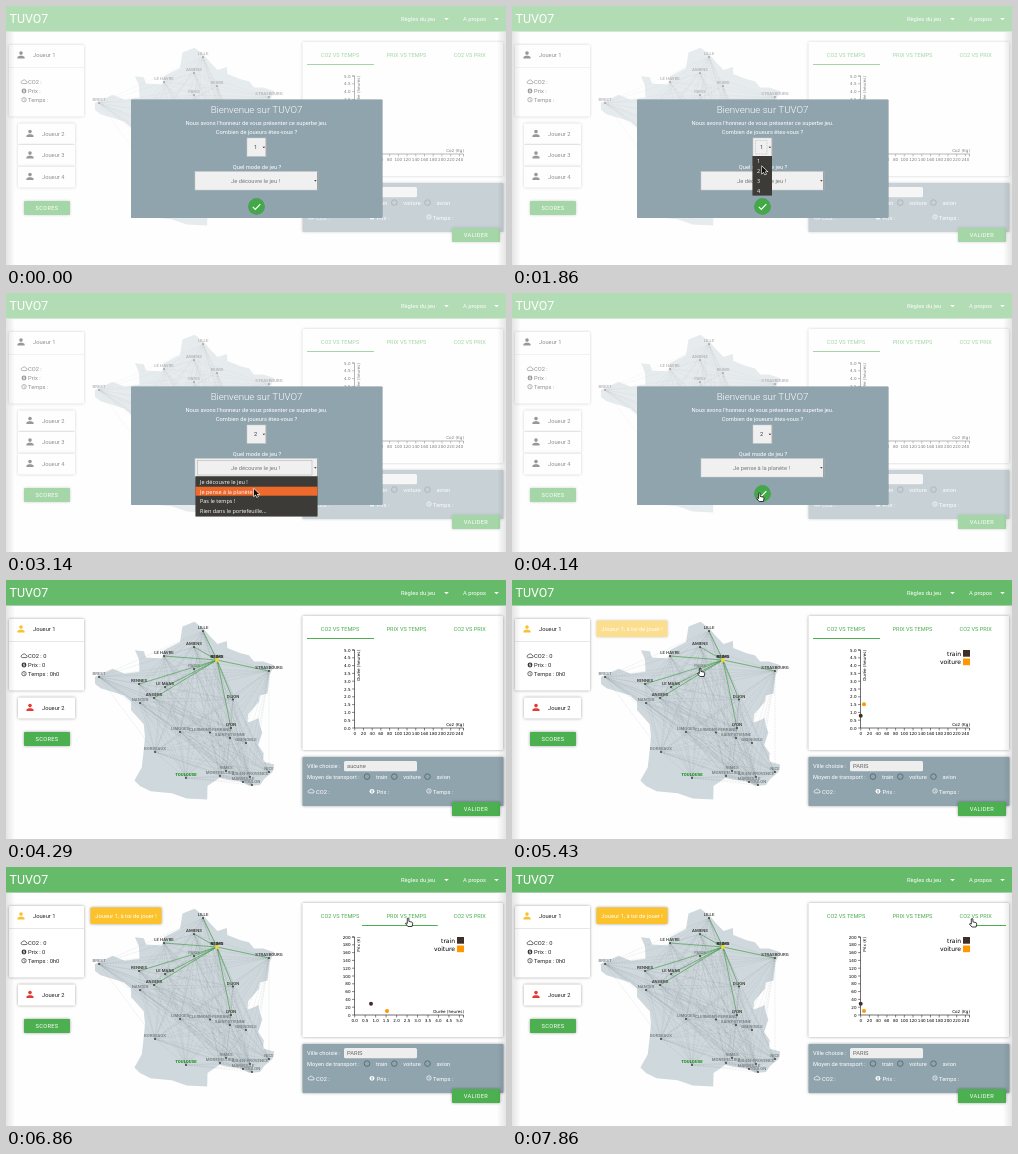
An HTML page for the animation above (8000 ms loop, 500x259 px).

```html
<!DOCTYPE html>
<html lang="fr">
<head>
<meta charset="utf-8">
<title>TUVO7</title>
<style>
html, body { margin: 0; width: 100%; height: 100%; overflow: hidden; background: #fefefe; }
svg { display: block; width: 100%; height: 100%; font: 5.75px Roboto, sans-serif; }
text { white-space: pre; }
.plot { font: 4.1px "DejaVu Sans", sans-serif; }
.menu { font: 5.5px "Open Sans", sans-serif; fill: #fff; }
.city { font: 500 4.3px Roboto, sans-serif; text-anchor: middle; }
.card { filter: drop-shadow(0 .8px 1.4px rgba(0,0,0,.36)); }
.flat { filter: drop-shadow(0 .4px .6px rgba(0,0,0,.2)); }
</style>
</head>
<body>
<svg id="stage" viewBox="0 0 500 259" preserveAspectRatio="none"></svg>
<script>
const LOOP = 8000, START = 4290, PICK = 5430;
const GREEN = '#4caf50', SLATE = '#90a4ae', DARK = '#3e2f28', ORANGE = '#ff9800';

const text = (x, y, s, a = '') => `<text x="${x}" y="${y}" ${a}>${s}</text>`;
const mid = (x, y, s, a = '') => text(x, y, s, 'text-anchor="middle" ' + a);
const rect = (x, y, x2, y2, fill, a = '') =>
  `<rect x="${x}" y="${y}" width="${x2 - x}" height="${y2 - y}" fill="${fill}" ${a}/>`;
const card = (x, y, x2, y2, fill = '#fff') => rect(x, y, x2, y2, fill, 'rx=".8" class="card"');
const dot = (x, y, r, fill, a = '') => `<circle cx="${x}" cy="${y}" r="${r}" fill="${fill}" ${a}/>`;
const path = (d, a = '') => `<path d="${d}" ${a}/>`;
const line = (x, y, x2, y2, a) => path(`M${x} ${y}L${x2} ${y2}`, a);
const group = (id, s, a = '') => `<g id="${id}" ${a}>${s}</g>`;
const caret = (x, y, w, fill) => path(`M${x - w} ${y}h${2 * w}l${-w} ${w}z`, `fill="${fill}"`);

const person = (x, y, fill) => dot(x, y - 1.9, 1.8, fill) +
  path(`M${x - 3.6} ${y + 3.5}v-.9c0-2.5 7.2-2.5 7.2 0v.9z`, `fill="${fill}"`);
const cloud = (x, y, c) => path(
  `M${x - 1.6} ${y + 1.6}a1.3 1.3 0 0 1 0-2.6a1.9 1.9 0 0 1 3.6 .3a1.1 1.1 0 0 1 0 2.3z`,
  `fill="none" stroke="${c}" stroke-width=".7"`);
const coin = (x, y, c, ink) => dot(x, y, 2.4, c) +
  path(`M${x + .7} ${y - .9}h-1.2v.9h1v.9h-1.2M${x} ${y - 1.6}v3.2`, `fill="none" stroke="${ink}" stroke-width=".5"`);
const clock = (x, y, c) => dot(x, y, 2.2, 'none', `stroke="${c}" stroke-width=".7"`) +
  path(`M${x} ${y - 1.3}v1.5l1 .6`, `fill="none" stroke="${c}" stroke-width=".5"`);

function button(x, y, w, label) {
  return card(x, y, x + w, y + 14, GREEN) +
    mid(x + w / 2, y + 9.1, label, 'fill="#fff" letter-spacing=".3" font-size="5.7"');
}

// Outline as longitude, latitude pairs
const COAST = [2.5,51.08, 3.15,50.75, 3.65,50.35, 4.15,50, 4.85,50.15, 4.85,49.8, 5.8,49.55, 6.4,49.45,
  6.75,49.15, 7.4,49.15, 8.2,48.97, 7.8,48.5, 7.55,47.6, 7,47.5, 6.9,47.2, 6.1,46.6, 6,46.2, 6.3,46.25,
  6.8,46.4, 6.85,46.05, 7,45.7, 6.65,45.1, 7,44.7, 6.9,44.3, 7.65,44.15, 7.5,43.78, 6.9,43.45, 6.6,43.15,
  5.9,43.1, 5.3,43.35, 4.5,43.4, 3.9,43.5, 3.1,43.1, 3.05,42.45, 1.7,42.5, .7,42.75, -.7,42.85, -1.4,43.1,
  -1.78,43.37, -1.3,44, -1.2,44.7, -1.1,45.5, -1.2,46.1, -2.1,46.8, -2.1,47.2, -2.6,47.5, -4.3,47.85,
  -4.7,48.05, -4.75,48.4, -3.5,48.8, -2.6,48.55, -1.55,48.65, -1.6,49.25, -1.9,49.7, -1.25,49.65,
  -1.1,49.35, .1,49.3, .2,49.7, 1.4,50.1, 1.6,50.85];

// Name, x, y, reachable by train from the start
const CITIES = [
  ['LILLE', 197, 51, 1], ['AMIENS', 188, 67, 1], ['LE HAVRE', 158, 76, 1], ['PARIS', 188, 89, 1],
  ['REIMS', 211, 80, 1], ['STRASBOURG', 263, 91, 1], ['BREST', 93, 97, 0], ['RENNES', 133, 104, 1],
  ['LE MANS', 159, 107, 1], ['ANGERS', 148, 118, 1], ['NANTES', 134, 123, 0], ['DIJON', 227, 119.5, 1],
  ['LIMOGES', 174, 152, 0], ['CLERMONT-FERRAND', 204, 152.5, 0], ['LYON', 225, 148, 1],
  ['SAINT-ETIENNE', 224, 158, 0], ['GRENOBLE', 240, 163, 0], ['BORDEAUX', 149, 172, 0],
  ['TOULOUSE', 180, 198, 0], ['NIMES', 220, 191, 0], ['MONTPELLIER', 214, 196, 0],
  ['AIX-EN-PROVENCE', 244, 197, 0], ['MARSEILLE', 237, 202, 0], ['TOULON', 246, 205, 0], ['NICE', 263, 192, 0]];

function map() {
  let d = '';
  for (let i = 0; i < COAST.length; i += 2) {
    const drop = 50.63 - COAST[i + 1];
    d += (i ? 'L' : 'M') + (155 + COAST[i] * (13.5 + drop * .2)).toFixed(1) + ' ' + (51 + drop * 20.6).toFixed(1);
  }
  let links = '', rails = '', idle = '', live = '';
  const hub = CITIES[4];
  CITIES.forEach((a, i) => {
    CITIES.slice(i + 1).forEach((b, j) => {
      if ((i * 3 + j) % 5 < 4) links += `M${a[1]} ${a[2]}L${b[1]} ${b[2]}`;
    });
    const [name, x, y, near] = a;
    if (near && a !== hub) rails += `M${hub[1]} ${hub[2]}L${x} ${y}`;
    idle += dot(x, y, 1, '#555') + `<text class="city" x="${x}" y="${y - 2}" fill="#666">${name}</text>`;
    const ink = a === hub ? '#000' : name === 'TOULOUSE' ? '#0a8a12' : near && name !== 'PARIS' ? '#333' : '#737b7f';
    live += dot(x, y, 1, '#444') + `<text class="city" x="${x}" y="${y - 2}" fill="${ink}" ${
      a === hub || name === 'TOULOUSE' ? 'style="font-weight:700"' : ''}>${name}</text>`;
  });
  return path(d + 'z', 'fill="#cfd8dc"') +
    path(links, 'fill="none" stroke="#78868d" stroke-width=".25" stroke-dasharray="1 .6" opacity=".6"') +
    group('idleMap', idle) +
    group('liveMap', path(rails, 'fill="none" stroke="#3c9a40" stroke-width=".6"') + live +
      dot(hub[1], hub[2], 2.1, '#f6d32d'));
}

function player(n, x, y, fill) {
  return person(x, y, fill) + text(x + 12, y + 2, 'Joueur ' + n, 'fill="#222"');
}

function left() {
  const stats = v => ['CO2 : ' + v[0], 'Prix : ' + v[1], 'Temps : ' + v[2]]
    .map((s, i) => text(22, 78.3 + i * 9, s, 'fill="#222"')).join('');
  const small = (n, y, fill) => card(12, y - 10, 69, y + 11) + player(n, 24, y, fill);
  return card(3, 39, 78, 110.5) + rect(3, 61, 78, 61.7, '#ddd') +
    cloud(18, 76, '#333') + coin(18, 85, '#333', '#fff') + clock(18, 93.7, '#333') +
    group('idleLeft', player(1, 15, 49, '#333') + stats(['', '', '']) +
      small(2, 127.5, '#333') + small(3, 149, '#333') + small(4, 170.5, '#333') + button(18, 195, 46, 'SCORES')) +
    group('liveLeft', player(1, 15, 49, '#fbc02d') + stats([0, 0, '0h0']) +
      small(2, 127.5, '#e53935') + button(18, 152, 46, 'SCORES'));
}

// An axis pair with tick labels; points are pixel positions
function plot(id, xs, ys, xName, yName, train, car) {
  let s = path('M346 70h2.5v78h109v2.5', 'fill="none" stroke="#111" stroke-width=".6"');
  ys.forEach((v, i) => {
    const y = 148 - i * 78 / (ys.length - 1);
    s += line(346, y, 348.5, y, 'stroke="#111" stroke-width=".5"') + text(344.5, y + 1.5, v, 'text-anchor="end"');
  });
  xs.forEach((v, i) => {
    const x = 348.7 + i * 104.7 / (xs.length - 1);
    s += line(x, 148, x, 150.5, 'stroke="#111" stroke-width=".5"') + mid(x, 155, v);
  });
  s += text(458, 146.3, xName, 'text-anchor="end"') +
    text(0, 0, yName, 'text-anchor="end" transform="translate(354 70) rotate(-90)"');
  const marks = dot(...train, 2, DARK) + dot(...car, 2, ORANGE);
  return group(id, s + `<g class="marks">${marks}</g>`, 'class="plot"');
}

const range = (n, step, digits = 0) => Array.from({ length: n }, (_, i) => (i * step).toFixed(digits));

function right() {
  const tab = (x, s) => mid(x, 50.7, s, `fill="${GREEN}" font-size="5.6"`);
  const kg = range(13, 20), hours = range(11, .5, 1), euros = range(11, 20);
  const legend = rect(451, 70, 458, 76.7, DARK) + rect(451, 78.5, 458, 85.2, ORANGE) +
    text(449, 75.6, 'train', 'text-anchor="end"') + text(449, 83.8, 'voiture', 'text-anchor="end"');
  const radio = (x, s) => dot(x, 196.6, 2.8, 'none', 'stroke="#4f626c" stroke-width=".8"') + text(x + 9, 198.7, s);
  return card(296.5, 36, 497, 170) +
    tab(334, 'CO2 VS TEMPS') + tab(400.5, 'PRIX VS TEMPS') + tab(463.7, 'CO2 VS PRIX') +
    `<rect id="bar" y="58" height="1" fill="${GREEN}"/>` +
    plot('plot0', kg, hours, 'Co2 (Kg)', 'Durée (heures)', [348.7, 135.8], [352, 124.3]) +
    plot('plot1', hours, euros, 'Durée (heures)', 'Prix (€)', [365, 136.8], [381, 144]) +
    plot('plot2', kg, euros, 'Co2 (Kg)', 'Prix (€)', [348.7, 136.8], [352, 144]) +
    group('legend', legend, 'style="font:6px \'DejaVu Sans\',sans-serif"') +
    card(296.5, 177, 497.5, 226, SLATE) +
    '<g fill="#fff">' + text(301, 188, 'Ville choisie :') + rect(338, 181, 411, 191.3, '#eee', 'rx="1.5"') +
    text(341, 188.2, 'aucune', 'id="town" fill="#666"') + text(301, 198.7, 'Moyen de transport :') +
    radio(361, 'train') + radio(388.3, 'voiture') + radio(421.5, 'avion') +
    cloud(305, 211.3, '#fff') + text(310, 213.7, 'CO2 :') +
    coin(366, 211.3, '#fff', SLATE) + text(370.5, 213.7, 'Prix :') +
    clock(423, 211, '#fff') + text(427, 213.7, 'Temps :') + '</g>' +
    button(446, 222, 48, 'VALIDER');
}

function header() {
  return rect(0, 0, 500, 25.5, '#66bb6a', 'class="flat"') +
    `<g fill="#fff">` + text(3.5, 17, 'TUVO7', 'font-size="12.4"') +
    text(395, 15, 'Règles du jeu') + text(457, 15, 'A propos') + '</g>' +
    caret(440.5, 12, 2.3, '#fff') + caret(490.5, 12, 2.3, '#fff');
}

function modal() {
  const field = (x, y, x2, y2) => rect(x, y, x2, y2, '#f0f0f0', 'stroke="#ccc" stroke-width=".5"') +
    line(x2 - .4, y, x2 - .4, y2, 'stroke="#777" stroke-width=".7"') +
    caret(x2 - 2.6, (y + y2) / 2 - .5, 1.3, '#111');
  return rect(125, 93.5, 376.5, 212, SLATE, 'rx=".8" class="flat"') +
    '<g fill="#fff">' + mid(250.5, 106.8, 'Bienvenue sur TUVO7', 'font-size="9.7" font-weight="300"') +
    mid(250.5, 119.3, "Nous avons l'honneur de vous présenter ce superbe jeu.") +
    mid(250.5, 128.2, 'Combien de joueurs êtes-vous ?') + mid(251, 163.2, 'Quel mode de jeu ?') + '</g>' +
    field(241, 132, 260.5, 150.3) + mid(249.5, 143.4, '1', 'id="count" fill="#444"') +
    rect(243.5, 134.5, 255, 148, 'none', 'id="focus1" stroke="#888" stroke-width=".4" stroke-dasharray=".8 .8"') +
    field(189, 165.5, 312, 184) + mid(249.5, 176.8, '', 'id="mode" fill="#777"') +
    rect(191.5, 167.5, 306, 182, 'none', 'id="focus2" stroke="#aaa" stroke-width=".5"') +
    dot(250.5, 200.5, 8.3, '#43a847', 'class="flat"') +
    path('M246.8 200.8l2.5 2.5l5-5.2', 'fill="none" stroke="#fff" stroke-width="1.2"');
}

const MODES = ['Je découvre le jeu !', 'Je pense à la planète !', 'Pas le temps !', 'Rien dans le portefeuille...'];

function menu(id, x, y, x2, y2, items, pad) {
  return group(id, rect(x, y, x2, y2, '#3c3b37', 'class="flat"') +
    `<rect class="pick" x="${x}" width="${x2 - x}" height="9" fill="#ee6a2c"/>` +
    items.map((s, i) => text(x + pad, y + 7.4 + i * 9.8, s)).join(''), 'class="menu"');
}

const toast = group('toast', card(84.5, 40.5, 155.5, 57, '#fcc22c') +
  mid(120, 50.8, 'Joueur 1, à toi de jouer !', 'fill="#fff" font-size="5.8"'));
const pointer = group('arrow', path('M0 0v7l1.7-1.5l1.2 2.5l1.2-.6l-1.2-2.4h2.2z',
    'fill="#111" stroke="#fff" stroke-width="1.1" paint-order="stroke"')) +
  group('hand', path('M-1.7 .4q.8-.8 1.6 0v3l3.2 .8q.8 .3 .6 1.4l-.6 2.9h-4.2l-2.5-3q.2-1.1 1.9 0z',
    'fill="#fff" stroke="#111" stroke-width=".8"'));

const stage = document.getElementById('stage');
stage.innerHTML =
  '<defs><linearGradient id="edge"><stop stop-color="#000" stop-opacity=".1"/>' +
  '<stop offset="1" stop-color="#000" stop-opacity="0"/></linearGradient></defs>' +
  rect(0, 0, 500, 259, '#fefefe') +
  group('game', map() + left() + right() + header()) +
  rect(0, 26, 9, 259, 'url(#edge)') +
  rect(0, 26, 9, 259, 'url(#edge)', 'transform="matrix(-1 0 0 1 500 0)"') +
  group('dialog', modal()) +
  menu('menu1', 240.5, 150, 260, 189.5, [1, 2, 3, 4], 4.5) +
  menu('menu2', 189.5, 183.3, 311.5, 223.5, MODES, 4.5) +
  toast + group('cursor', pointer);

const el = {};
stage.querySelectorAll('[id]').forEach(e => el[e.id] = e);
const marks = stage.querySelectorAll('.marks');
const show = (id, on) => el[id].style.display = on ? '' : 'none';

// Time, x, y
const MOVES = [[570, 300, 200], [1000, 281, 166], [1500, 252, 141], [1710, 252, 142], [1860, 250, 160.5],
  [2200, 250, 164], [2500, 253, 178], [2860, 253, 178], [3000, 250, 187], [3140, 248, 196], [3570, 247, 196],
  [3860, 249, 200], [4290, 248, 200], [4860, 240, 170], [5290, 189, 88], [5500, 189, 88], [6000, 345, 65],
  [6140, 367, 58], [6500, 403, 51], [6900, 403, 51], [7300, 460, 51.5], [7860, 461, 51.5]];
const TABS = [[301, 368], [368, 433], [459, 494]];

const clamp = v => Math.max(0, Math.min(1, v));
const ease = v => 1 - (1 - clamp(v)) ** 3;

function place(t) {
  const i = MOVES.findIndex(m => m[0] > t);
  if (i < 0) return MOVES[MOVES.length - 1].slice(1);
  if (!i) return MOVES[0].slice(1);
  const [t0, x0, y0] = MOVES[i - 1], [t1, x1, y1] = MOVES[i];
  let k = (t - t0) / (t1 - t0);
  k = k * k * (3 - 2 * k);
  return [x0 + (x1 - x0) * k, y0 + (y1 - y0) * k];
}

function draw(t) {
  const live = t >= START, picked = t >= PICK;
  el.game.setAttribute('opacity', live ? 1 : .5);
  for (const part of ['Map', 'Left']) {
    show('idle' + part, !live);
    show('live' + part, live);
  }
  show('dialog', !live);

  const open1 = t >= 1710 && t < 2290, open2 = t >= 2570 && t < 3570;
  show('menu1', open1);
  show('menu2', open2);
  show('focus1', open1);
  show('focus2', open2);
  el.count.textContent = t < 2290 ? 1 : 2;
  el.mode.textContent = MODES[t < 3570 ? 0 : 1];
  const pick1 = el.menu1.querySelector('.pick');
  pick1.setAttribute('y', 160.3);
  pick1.style.display = t >= 2000 ? '' : 'none';
  el.menu2.querySelector('.pick').setAttribute('y', t < 3000 ? 183.9 : 193.7);

  el.town.textContent = picked ? 'PARIS' : 'aucune';
  show('legend', picked);
  marks.forEach(m => m.style.display = picked ? '' : 'none');

  const tab = t < 6640 ? 0 : t < 7380 ? 1 : 2;
  const since = t - [0, 6640, 7380][tab];
  for (let i = 0; i < 3; i++) show('plot' + i, i === tab);
  const from = TABS[Math.max(0, tab - 1)], to = TABS[tab];
  const a = from[0] + (to[0] - from[0]) * ease((since - 90) / 300);
  const b = from[1] + (to[1] - from[1]) * ease(since / 300);
  el.bar.setAttribute('x', a);
  el.bar.setAttribute('width', b - a);

  show('toast', t >= 4860);
  const pulse = .75 + .25 * Math.cos((t - 7860) / 1000 * 2 * Math.PI);
  el.toast.setAttribute('opacity', pulse * clamp((t - 4860) / 300));

  const hand = t >= 3860 && t < START || t >= 5200 && t < 5560 || t >= 6400;
  show('cursor', t >= 570 && t < START || t >= 4860);
  show('arrow', !hand);
  show('hand', hand);
  el.cursor.setAttribute('transform', `translate(${place(t)})`);
}

const begin = performance.now();
function tick() {
  draw((performance.now() - begin) % LOOP);
  requestAnimationFrame(tick);
}
draw(0);
requestAnimationFrame(tick);
</script>
</body>
</html>
```
